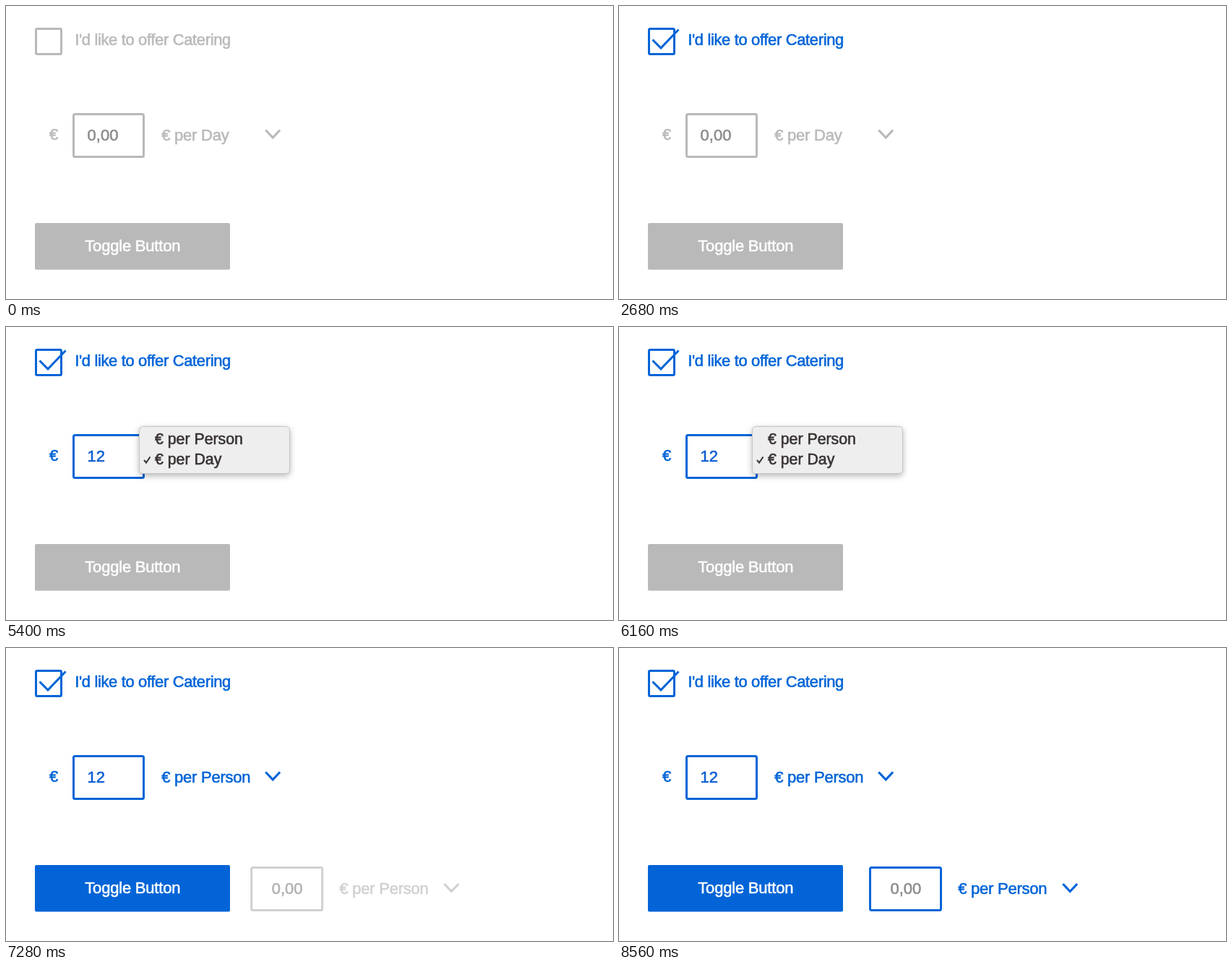
An HTML page for the animation above (8640 ms loop, 840x405 px).

```html
<!DOCTYPE html>
<html lang="en">
<head>
<meta charset="utf-8">
<title>Form controls</title>
<style>
  html, body { margin: 0; width: 100%; height: 100%; overflow: hidden; background: #fff; }
  svg { display: block; width: 840px; height: 405px; }
  text {
    font: 22px "Liberation Sans", Arial, sans-serif;
    fill: currentColor; stroke: currentColor; stroke-width: .6px;
    white-space: pre;
  }
  .line { fill: none; stroke: currentColor; stroke-width: 3; }
  .chevron { stroke-width: 3.2; }
  .caret { fill: #0f60d4; }
  .unit { letter-spacing: -.24px; }
  #label { letter-spacing: -.36px; }
  #button text { color: #fff; letter-spacing: -.2px; }
  #menu { filter: drop-shadow(0 3px 4px rgba(0, 0, 0, .28)); }
  #menu text { font-size: 21.3px; }
</style>
</head>
<body>
<svg viewBox="0 0 840 405">
  <g id="option">
    <rect class="line" x="41.5" y="31.5" width="35" height="35" rx="1.5"/>
    <path id="tick" class="line" d="M46.5 46.5L58 58L82.5 32.5" pathLength="1" stroke-dasharray="1 2"/>
    <text id="label" x="95.2" y="54">I'd like to offer Catering</text>
  </g>

  <g id="price">
    <text x="60" y="185">€</text>
    <rect class="line" x="93.5" y="149.5" width="97" height="59" rx="2"/>
    <text id="unit" class="unit" x="215.2" y="186">€ per Day</text>
    <path class="line chevron" d="M359.3 171.5L369.2 182L379.1 171.5"/>
  </g>
  <text id="amount" x="112.6" y="186">0,00</text>
  <rect id="caret" class="caret" x="113" y="167" width="2" height="23"/>

  <g id="button">
    <rect x="40" y="300" width="270" height="64.5" rx="2" fill="currentColor"/>
    <text x="109.3" y="339">Toggle Button</text>
  </g>

  <g id="extra">
    <rect class="line" x="347.5" y="303.5" width="98" height="59" rx="2"/>
    <text x="375.5" y="340" color="#8c8c8c">0,00</text>
    <text class="unit" x="469.2" y="340">€ per Person</text>
    <path class="line chevron" d="M614.3 326L624.2 336.5L634.1 326"/>
  </g>
  <rect id="caret2" class="caret" x="399" y="322" width="2" height="23"/>

  <g id="menu">
    <rect x="184.5" y="137.5" width="208" height="65" rx="5" fill="#eee" stroke="#c4c4c4"/>
    <rect id="bar" x="185" width="207" height="28" fill="#3e8af7"/>
    <text id="person" x="206" y="162">€ per Person</text>
    <g id="day">
      <path class="line" style="stroke-width:2" d="M191 184L194 187.5L199.5 179.5"/>
      <text x="206" y="190">€ per Day</text>
    </g>
  </g>
</svg>
<script>
  const LOOP = 8640, STEP = 40;
  const GREY = [185, 185, 185], BLUE = [2, 100, 215];
  const el = {};
  document.querySelectorAll('[id]').forEach(n => el[n.id] = n);

  // Menu row under the pointer, by start time
  const HOVER = [[5160, 'day'], [5400, ''], [5640, 'day'], [5800, 'person'], [6160, ''], [6200, 'person']];

  const ramp = (t, a, b) => Math.min(1, Math.max(0, (t - a) / (b - a)));
  const within = (t, a, b) => t >= a && t < b;
  const easeOut = p => 1 - (1 - p) ** 3;
  const tint = (node, p) => {
    node.style.color = `rgb(${GREY.map((g, i) => Math.round(g + (BLUE[i] - g) * p))})`;
  };
  const show = (node, on) => { node.style.display = on ? '' : 'none'; };
  const write = (node, s) => { if (node.textContent !== s) node.textContent = s; };

  function drawMenu(t) {
    show(el.menu, within(t, 5160, 6520));
    el.menu.style.opacity = 1 - ramp(t, 6200, 6520);
    const row = HOVER.reduce((r, [at, name]) => t >= at ? name : r, '');
    show(el.bar, row);
    el.bar.setAttribute('y', row === 'person' ? 142 : 170);
    for (const name of ['person', 'day'])
      el[name].style.color = row === name ? '#fff' : '#393333';
  }

  function draw(t) {
    tint(el.option, t >= 2320 ? 1 : 0);
    const tick = ramp(t, 2320, 2680);
    show(el.tick, tick > 0);
    el.tick.style.strokeDashoffset = 1 - tick;

    tint(el.price, ramp(t, 3360, 3560));
    write(el.unit, t < 6680 ? '€ per Day' : '€ per Person');
    write(el.amount, t < 4280 ? '0,00' : t < 4360 ? '1' : '12');
    el.amount.style.color = t < 4280 ? '#8c8c8c' : '#0f60d4';
    show(el.caret, within(t, 3400, 3920) || within(t, 4280, 4840));
    el.caret.setAttribute('x', t < 4280 ? 113 : t < 4360 ? 124 : 135);

    tint(el.button, ramp(t, 6640, 6880));
    show(el.extra, t >= 7080);
    tint(el.extra, ramp(t, 7920, 8040));
    el.extra.style.opacity = ramp(t, 7040, 7400);
    const slide = easeOut(ramp(t, 7080, 7720));
    el.extra.setAttribute('transform', `translate(${-24 * (1 - slide)} 0)`);
    show(el.caret2, within(t, 8040, 8560));

    drawMenu(t);
  }

  const start = performance.now();
  function tickFrame(now) {
    const t = Math.max(0, now - start) % LOOP;
    draw(Math.floor(t / STEP) * STEP);
    requestAnimationFrame(tickFrame);
  }
  draw(0);
  requestAnimationFrame(tickFrame);
</script>
</body>
</html>
```
